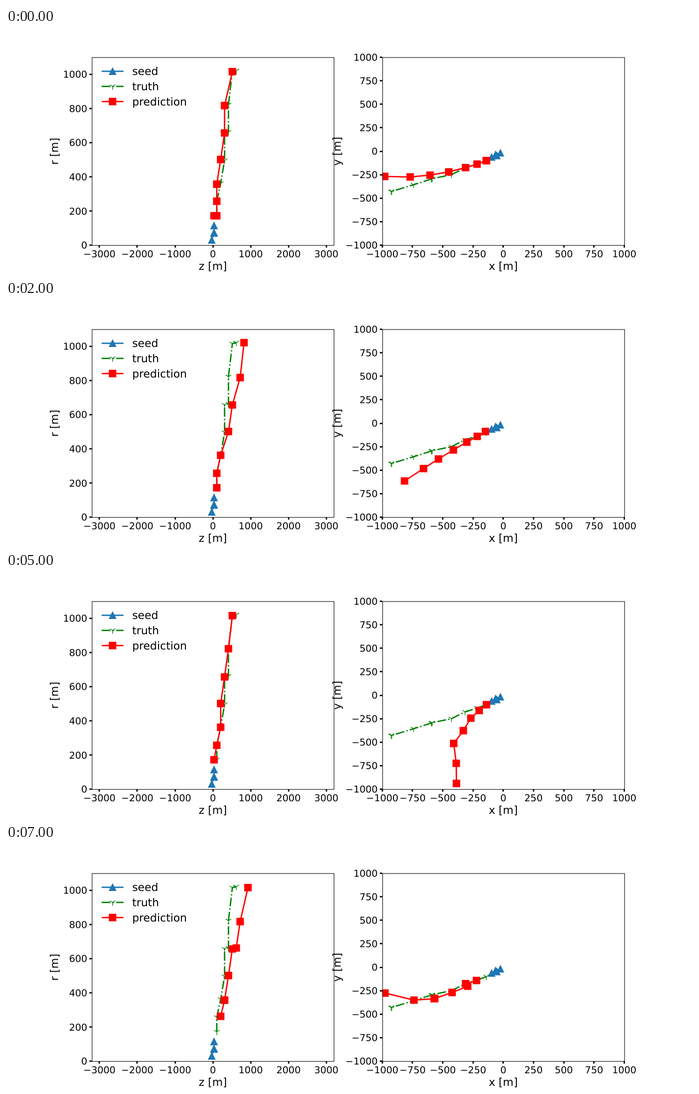
Write an HTML page that moves like this. It is 1252 px wide and 447 px high and loops after 8 s.

```html
<!DOCTYPE html>
<html lang="en">
<head>
<meta charset="utf-8">
<title>Track prediction</title>
<style>
html, body { margin: 0; width: 100%; height: 100%; overflow: hidden; background: #fff; }
svg { display: block; font: 19.44px "DejaVu Sans", sans-serif; text-rendering: geometricPrecision; }
.big { font-size: 22.22px; }
polyline { fill: none; stroke-width: 2.78; stroke-linejoin: round; }
.seed { stroke: #1f77b4; marker: url(#seed); }
.truth { stroke: #008000; stroke-dasharray: 17.8 4.44 2.78 4.44; marker: url(#truth); }
.prediction { stroke: #f00; marker: url(#prediction); }
.key { marker-start: none; marker-end: none; }
.frame { fill: none; stroke: #000; stroke-width: 1.11; }
.tick { stroke: #000; stroke-width: 2.78; }
</style>
</head>
<body>
<svg id="stage" width="1252" height="447" viewBox="0 0 1400 500" preserveAspectRatio="none">
  <defs>
    <marker id="seed" markerUnits="userSpaceOnUse" overflow="visible">
      <path d="M0-6.94L6.94 6.94H-6.94Z" fill="#1f77b4" stroke="#1f77b4" stroke-width="1.39"/>
    </marker>
    <marker id="truth" markerUnits="userSpaceOnUse" overflow="visible">
      <path d="M0 0V6.94M0 0L5.55-3.47M0 0L-5.55-3.47" fill="none" stroke="#008000" stroke-width="1.39"/>
    </marker>
    <marker id="prediction" markerUnits="userSpaceOnUse" overflow="visible">
      <path d="M-7.64-7.64H7.64V7.64H-7.64Z" fill="#f00"/>
    </marker>
  </defs>
</svg>
<script>
const TOP = 60, BOTTOM = 445, WIDTH = 493.18;
const stage = document.getElementById("stage");

// Detector: layer radii and z bins; even bins sit slightly further out.
const RADII = [172, 257, 357, 496, 657, 817, 1016], BIN = 103;

function hit(layer, binAt, angle) {
  const bin = Math.round(binAt);
  return { r: RADII[layer] + (bin && bin % 2 === 0 ? 5.5 : 0), z: bin * BIN || 30, angle };
}

// Keys are [layer, z bin, angle]; the layers between two keys are interpolated.
function trace(keys) {
  const hits = [];
  keys.forEach((a, i) => {
    hits.push(hit(...a));
    const b = keys[i + 1] || a;
    for (let l = a[0] + 1; l < b[0]; l++) {
      const k = (l - a[0]) / (b[0] - a[0]);
      hits.push(hit(l, a[1] + (b[1] - a[1]) * k, a[2] + (b[2] - a[2]) * k));
    }
  });
  return hits;
}

const seed = [
  { r: 30, z: -30, angle: 36 }, { r: 73, z: 30, angle: 29 },
  { r: 71, z: 30, angle: 41 }, { r: 115, z: 30, angle: 33 }
];
const truth = trace([[0, 0.9, 35.6], [2, 2, 29.3], [3, 3, 30.2], [4, 3, 26.5], [4, 3.9, 26.5], [6, 5, 24.9], [6, 6, 24.9]]);

// One predicted track per second.
const predictions = [
  [[0, 0, 35.6], [0, 1, 35.6], [2, 1, 29.2], [5, 3.4, 19.6], [6, 5, 15.3]],
  [[1, 2, 41], [2, 3, 42], [2, 3, 48.9], [3, 4, 48.8], [5, 8, 61.8]],
  [[0, 1, 30.8], [1, 1, 33], [6, 8, 37]],
  [[0, 1, 35], [1, 2, 41], [4, 5.5, 44.3], [5, 7, 49.5], [6, 9, 70]],
  [[0, 0.9, 35], [2, 2, 29], [4, 3, 18], [6, 5, 6]],
  [[0, 0, 36], [2, 2, 42.3], [3, 2, 48.8], [4, 3, 51.4], [5, 4, 61.8], [6, 5, 67.6]],
  [[0, 0, 30.8], [2, 1, 16.7], [3, 3, 7.3], [4, 2, 5.5], [5, 3, -7.2], [6, -6, 29.9]],
  [[1, 2, 32.5], [2, 3, 29.4], [2, 3, 34.5], [4, 5, 30.4], [4, 6, 30.4], [5, 7, 25.4], [6, 9, 15.7]]
].map(trace);

function add(parent, tag, attrs, text) {
  const el = document.createElementNS("http://www.w3.org/2000/svg", tag);
  for (const k in attrs) el.setAttribute(k, attrs[k]);
  if (text !== undefined) el.textContent = text;
  parent.append(el);
  return el;
}

const label = n => String(n).replace("-", "\u2212");
const snap = v => Math.floor(v + 0.5) + 0.5;

function ticks(from, to, step, place) {
  for (let n = from; n <= to; n += step) place(n);
}

// Draws one set of axes and returns a function that shows a predicted track.
function panel(left, xr, yr, xt, yt, names, nameX, project) {
  const px = x => left + (x - xr[0]) / (xr[1] - xr[0]) * WIDTH;
  const py = y => BOTTOM - (y - yr[0]) / (yr[1] - yr[0]) * (BOTTOM - TOP);
  const points = hits => hits.map(project).map(([x, y]) => [px(x), py(y)]).join(" ");

  const id = "clip" + left;
  const clip = add(stage, "clipPath", { id });
  add(clip, "rect", { x: left, y: TOP, width: WIDTH, height: BOTTOM - TOP });
  const g = add(stage, "g", { "clip-path": `url(#${id})` });
  add(g, "polyline", { class: "seed", points: points(seed) });
  add(g, "polyline", { class: "truth", points: points(truth) });
  const track = add(g, "polyline", { class: "prediction" });

  ticks(...xt, n => {
    add(stage, "path", { class: "tick", d: `M${Math.round(px(n))} 445v5` });
    add(stage, "text", { x: px(n), y: 469.7, "text-anchor": "middle" }, label(n));
  });
  ticks(...yt, n => {
    add(stage, "path", { class: "tick", d: `M${left} ${Math.round(py(n))}h-5` });
    add(stage, "text", { x: left - 9.3, y: py(n) + 7.1, "text-anchor": "end" }, label(n));
  });
  const x = snap(left), y = snap(TOP);
  add(stage, "rect", { class: "frame", x, y, width: snap(left + WIDTH) - x, height: snap(BOTTOM) - y });
  add(stage, "text", { class: "big", x: left + WIDTH / 2, y: 496, "text-anchor": "middle" }, names[0]);
  add(stage, "text", {
    class: "big", "text-anchor": "middle",
    transform: `translate(${nameX} ${(TOP + BOTTOM) / 2}) rotate(-90)`
  }, names[1]);
  return hits => track.setAttribute("points", points(hits));
}

const showSide = panel(175, [-3200, 3200], [0, 1100], [-3000, 3000, 1000], [0, 1000, 200],
  ["z [m]", "r [m]"], 106.3, h => [h.z, h.r]);
const showFront = panel(766.82, [-1000, 1000], [-1000, 1000], [-1000, 1000, 250], [-1000, 1000, 250],
  ["x [m]", "y [m]"], 681.7, h => {
    const a = h.angle * Math.PI / 180;
    return [-h.r * Math.cos(a), -h.r * Math.sin(a)];
  });

const legend = add(stage, "g", {});
["seed", "truth", "prediction"].forEach((name, i) => {
  const y = 88.7 + i * 31;
  add(legend, "polyline", { class: name + " key", points: `195,${y} 217.2,${y} 239.4,${y}` });
  add(legend, "text", { class: "big", x: 257.2, y: y + 7.8 }, name);
});

const start = performance.now();
function draw() {
  const step = Math.floor((performance.now() - start) / 1000) % predictions.length;
  showSide(predictions[step]);
  showFront(predictions[step]);
  // The legend moves down when a track crosses its usual corner.
  const blocked = predictions[step].some(h => h.z < -BIN);
  legend.setAttribute("transform", `translate(0 ${blocked ? 263 : 0})`);
  requestAnimationFrame(draw);
}
draw();
</script>
</body>
</html>
```
